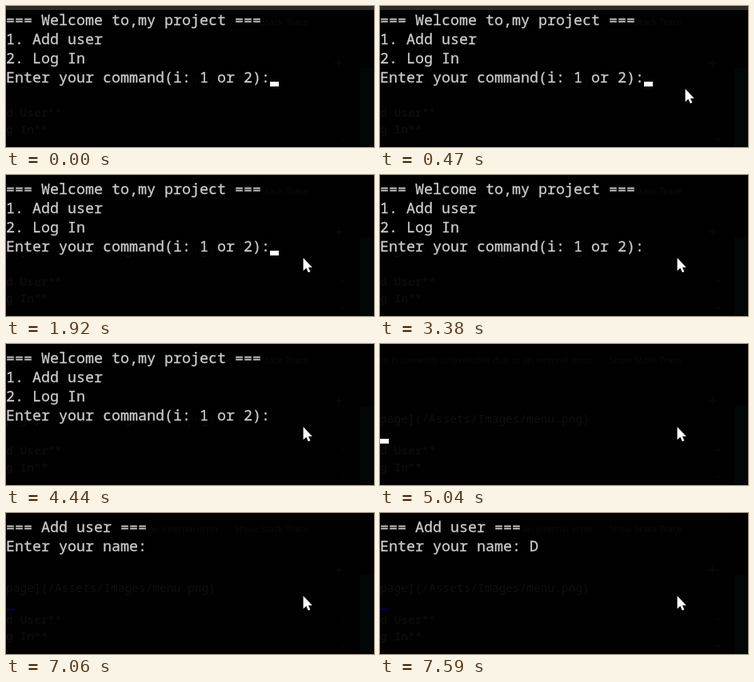
These frames come from a looping animation (460x177 px, 8000 ms). An HTML page:

```html
<!DOCTYPE html>
<html lang="en">
<head>
<meta charset="utf-8">
<title>Console menu</title>
<style>
  html, body { margin: 0; width: 100%; height: 100%; overflow: hidden; background: #000; }
  svg { display: block; }
  text { white-space: pre; }
  .line { font: 18.333px "Noto Sans Mono", "DejaVu Sans Mono", monospace; fill: #ccc; stroke: #ccc; stroke-width: .3px; }
  .code { font: 14.55px "Noto Sans Mono", monospace; fill: #101010; }
  .bold { font-weight: 700; fill: #0b0b0b; }
  .note { font: 11.5px "Open Sans", "Noto Sans", sans-serif; fill: #0c0c0c; }
</style>
</head>
<body>
<svg width="460" height="177" viewBox="0 0 460 177">
  <rect width="460" height="177" fill="#010101"/>
  <!-- editor showing dimly through the console -->
  <rect x="443" y="78" width="17" height="99" fill="#010706"/>
  <text class="note" x="-11" y="24">ture is currently unavailable due to an internal error.</text>
  <text class="note" x="286" y="24">Show Stack Trace</text>
  <text class="code" x="0" y="99">page](/Assets/Images/menu.png)</text>
  <text class="code bold" x="0" y="139">d User**</text>
  <text class="code bold" x="0" y="160">g In**</text>
  <path d="M411 71.5h10M416 66.5v10M420 133h4M420 167h4" stroke="#0a0a0a" stroke-width="1.5"/>
  <rect id="bar" width="460" height="5"/>
  <rect id="trail" y="120" width="11" height="2" fill="#000050"/>
  <g id="screen"></g>
  <rect id="caret" width="11" height="6" fill="#fff"/>
  <path id="mouse" d="M-.4 -1V15.2L3.4 11.8L5.8 17.3L8.4 16.2L6 10.9H10.8Z" fill="#fff"/>
</svg>
<script>
const LOOP = 8000, CELL = 11, ROW = 24, TOP = 5;
const $ = id => document.getElementById(id);
const [bar, trail, screen, caret, mouse] = ['bar', 'trail', 'screen', 'caret', 'mouse'].map($);

const menu = ['=== Welcome to,my project ===', '1. Add user', '2. Log In',
              'Enter your command(i: 1 or 2):'];
const form = ['=== Add user ===', 'Enter your name: '];
const typed = (lines, key) => [...lines.slice(0, -1), lines.at(-1) + key];

// Each track lists [start ms, value]; values hold until the next step.
const pages = [[0, menu], [4510, typed(menu, '1')], [5040, []], [5110, form],
               [7390, typed(form, 'D')]];
// Caret cell as [column, row], or null while blinked off.
const carets = [[0, [30, 3]], [1250, null], [1790, [30, 3]], [2320, null], [2850, [30, 3]],
                [3380, null], [3910, [30, 3]], [4440, null], [4510, [31, 3]], [4970, [0, 4]],
                [5110, [17, 1]], [5970, null], [6520, [17, 1]], [7060, null],
                [7390, [18, 1]], [7590, null]];
const mice = [[0, null], [240, [391, 145]], [310, [388, 131]], [400, [384, 113]],
              [470, [382, 105]], [1380, [381, 105]], [1450, [380, 105]], [1520, [378, 105]],
              [1650, [376, 105]], [1790, [375, 105]], [1860, [373, 105]], [1920, [372, 105]]];
const bars = [[0, '#2b2b2b'], [730, '#161616'], [860, '#010101']];

const at = (track, t) => track.findLast(([start]) => start <= t)[1];

function add(tag, attrs, label = '') {
  const el = document.createElementNS('http://www.w3.org/2000/svg', tag);
  for (const name in attrs) el.setAttribute(name, attrs[name]);
  el.textContent = label;
  screen.append(el);
}

let shown;
function showPage(lines) {
  if (lines === shown) return;
  shown = lines;
  screen.replaceChildren();
  lines.forEach((line, row) => {
    const y = TOP + row * ROW;
    add('rect', { y, width: line.length * CELL, height: ROW, fill: '#000', 'fill-opacity': .6 });
    add('text', { class: 'line', x: 0, y: y + 19 }, line);
  });
}

function place(el, pos) {
  el.style.display = pos ? '' : 'none';
  if (pos) el.setAttribute('transform', `translate(${pos})`);
}

function draw(now) {
  const t = now % LOOP, cell = at(carets, t);
  showPage(at(pages, t));
  bar.setAttribute('fill', at(bars, t));
  trail.style.display = t >= 5110 ? '' : 'none';
  place(caret, cell && [cell[0] * CELL, TOP + cell[1] * ROW + 18]);
  place(mouse, at(mice, t));
}

const begin = performance.now();
function tick() {
  draw(performance.now() - begin);
  requestAnimationFrame(tick);
}
tick();
</script>
</body>
</html>
```
